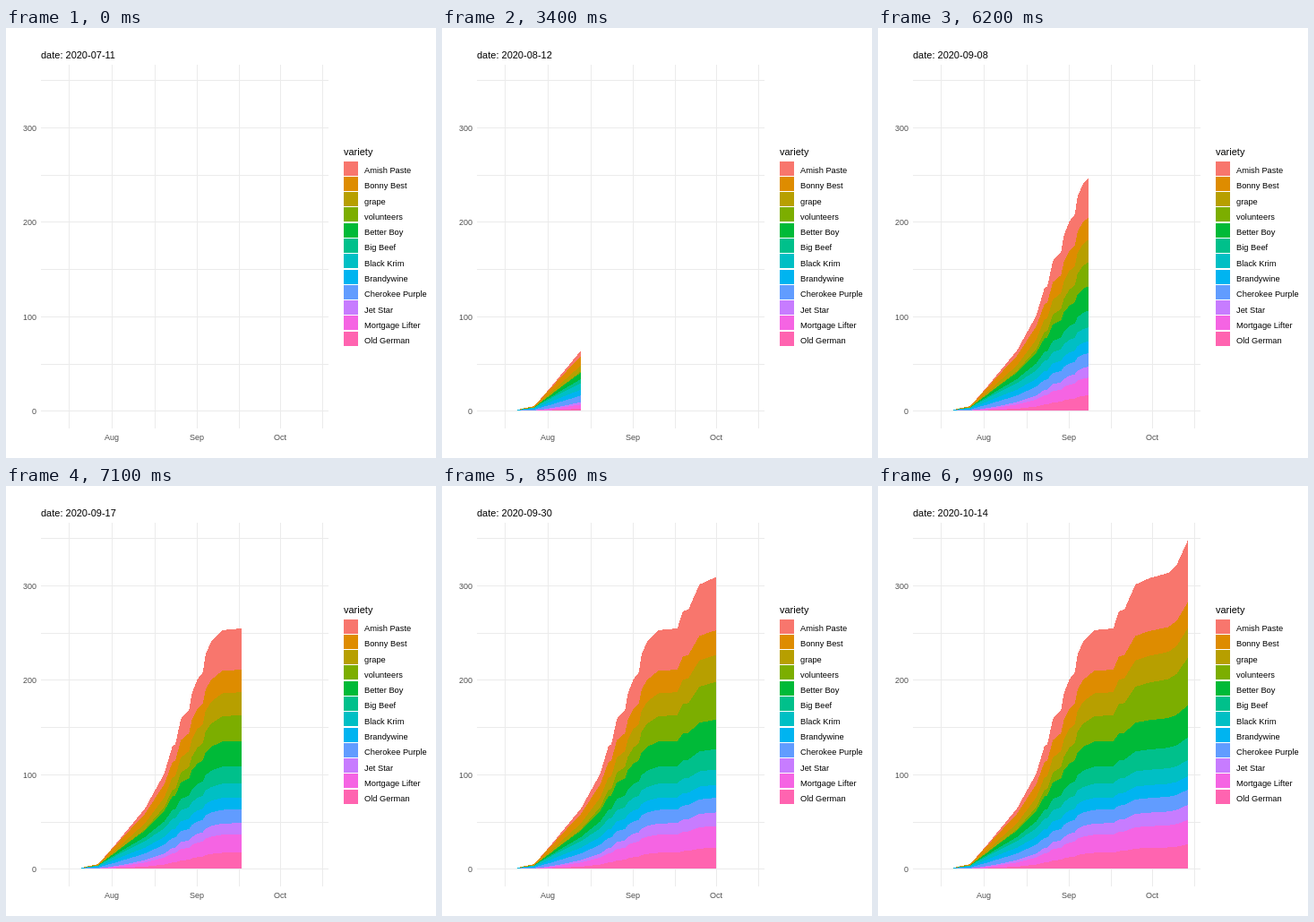
An HTML page for the animation above (10000 ms loop, 480x480 px).

```html
<!DOCTYPE html>
<html lang="en">
<head>
<meta charset="utf-8">
<title>Tomato harvest by variety</title>
<style>
  html, body { margin: 0; width: 100%; height: 100%; overflow: hidden; background: #fff; }
  svg { display: block; width: 480px; height: 480px; font-family: "Liberation Sans", Arial, sans-serif; }
  rect, path { shape-rendering: crispEdges; }
</style>
</head>
<body>
<svg id="chart" viewBox="0 0 480 480">
  <clipPath id="reveal"><rect id="window" y="0" height="480"/></clipPath>
</svg>
<script>
const BASE = 427, PEAK = 366, FIRST_DAY = 10, LAST_DAY = 95, FRAMES = 100, STEP = 100;

// Name, colour, final height in pixels, growth exponent (above 1 ripens late)
const varieties = [
  ["Amish Paste", "#F8766D", 69, 1.35],
  ["Bonny Best", "#DE8C00", 29, .5],
  ["grape", "#B79F00", 33, .85],
  ["volunteers", "#7CAE00", 53, 2],
  ["Better Boy", "#00BA38", 36, .85],
  ["Big Beef", "#00C08B", 25, .9],
  ["Black Krim", "#00BFC4", 18, .45],
  ["Brandywine", "#00B4F0", 15, .4],
  ["Cherokee Purple", "#619CFF", 17, .4],
  ["Jet Star", "#C77CFF", 17, 1],
  ["Mortgage Lifter", "#F564E3", 27, .95],
  ["Old German", "#FF64B0", 27, 1.4]
];

// Turning points of the whole stack: day, height in pixels
const turns = [
  [10, 1], [16, 5], [22, 26], [33, 67], [40, 106], [43, 137], [44, 138], [46, 167],
  [49, 177], [50, 195], [52, 211], [54, 219], [55, 239], [57, 253], [61, 266], [68, 268],
  [70, 287], [72, 289], [76, 317], [81, 324], [88, 330], [91, 339], [95, PEAK]
];

const svg = document.getElementById("chart");
const win = document.getElementById("window");
const dayX = d => 53.75 + 3.073 * d;

function add(tag, attrs, text = "") {
  const el = document.createElementNS("http://www.w3.org/2000/svg", tag);
  for (const key in attrs) el.setAttribute(key, attrs[key]);
  el.textContent = text;
  return svg.appendChild(el);
}

function label(text, x, y, size, fill = "#000", anchor = "start") {
  return add("text", { x, y, fill, "font-size": size, "text-anchor": anchor }, text);
}

const bar = (x, y, width, height, fill) => add("rect", { x, y, width, height, fill });

function totalAt(day) {
  const i = Math.max(1, turns.findIndex(([d]) => d >= day));
  const [[d0, h0], [d1, h1]] = [turns[i - 1], turns[i]];
  return h0 + (h1 - h0) * (day - d0) / (d1 - d0);
}

// Height of layer k and those below it when the whole stack is h tall
function layerTop(h, k) {
  const parts = varieties.map(([, , end, power]) => end * (h / PEAK) ** power);
  const sum = list => list.reduce((a, b) => a + b, 0);
  return h * sum(parts.slice(k)) / sum(parts);
}

// Grid and axes
for (const x of [70, 118, 166, 213, 260, 306, 353]) bar(x, 41, 1, 406, "#EBEBEB");
for (let k = 0; k < 8; k++) {
  const y = Math.round(427.25 - 52.7 * k);
  bar(39, y, 321, 1, "#EBEBEB");
  if (k % 2 === 0) label(k * 50, 34, y + 4, 9, "#4D4D4D", "end");
}
[["Aug", 118], ["Sep", 213], ["Oct", 306]].forEach(([m, x]) => label(m, x, 460, 9, "#4D4D4D", "middle"));

// Layers, each reaching down to the baseline, and the legend
label("variety", 377, 142, 11);
varieties.forEach(([name, fill], k) => {
  let d = `M${dayX(FIRST_DAY)} ${BASE}`;
  for (let day = FIRST_DAY; day <= LAST_DAY; day++) {
    d += `L${dayX(day)} ${BASE - layerTop(totalAt(day), k)}`;
  }
  add("path", { d: d + `V${BASE}Z`, fill, "clip-path": "url(#reveal)" });
  bar(377, Math.floor(149.1 + 17.28 * k), 16, 16, fill);
  label(name, 400, Math.round(162 + 17.28 * k), 9.3);
});

const title = label("", 39, 34, 11);

function draw(now) {
  const day = Math.floor(now / STEP) % FRAMES * LAST_DAY / (FRAMES - 1);
  const date = new Date(Date.UTC(2020, 6, 11 + Math.floor(day)));
  title.textContent = "date: " + date.toISOString().slice(0, 10);
  win.setAttribute("width", Math.round(dayX(Math.round(day))));
  requestAnimationFrame(draw);
}
draw(0);
</script>
</body>
</html>
```
